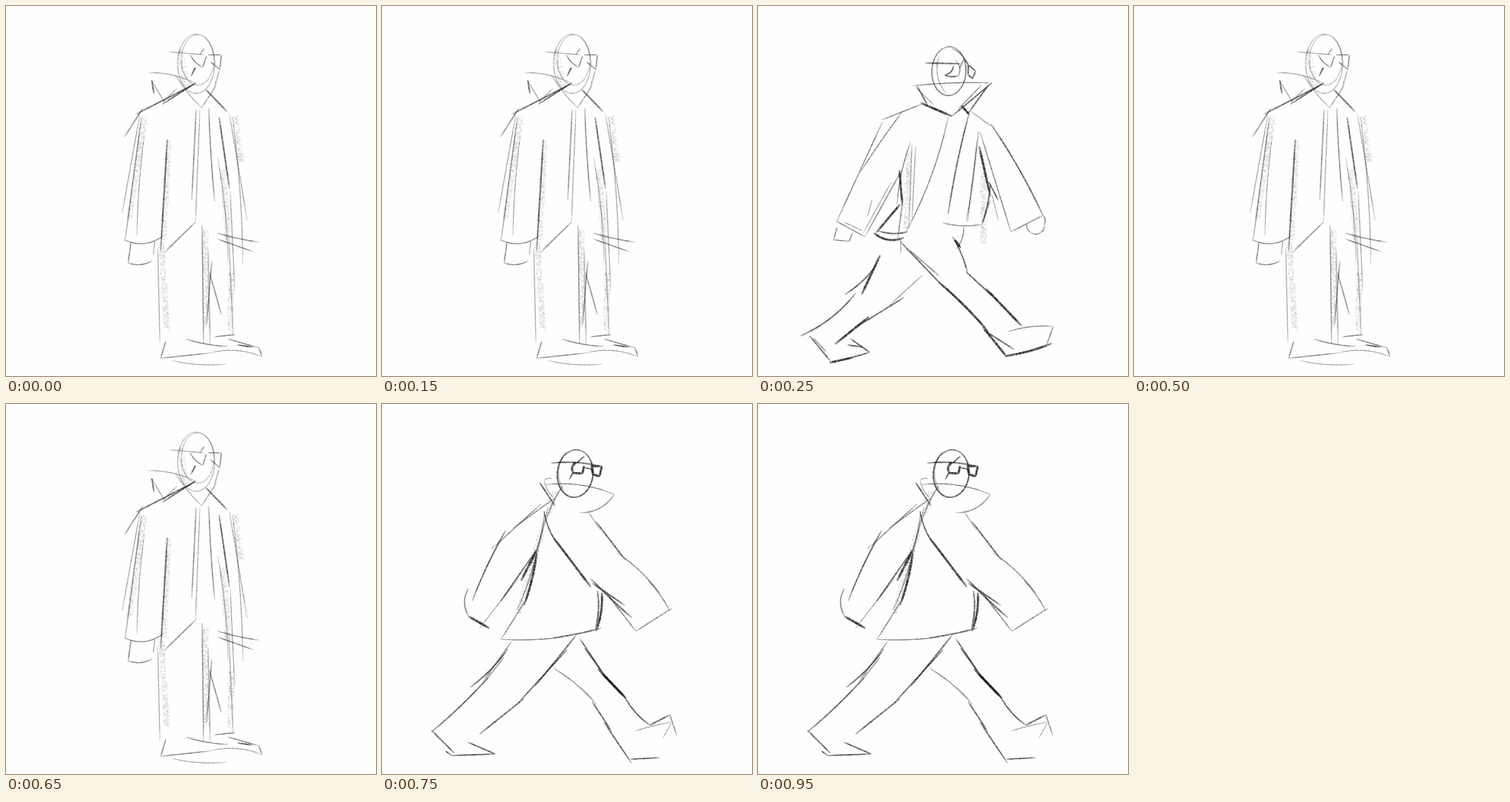
Animation of 500 by 500 pixels, one loop 1080 ms. Source, as an HTML page with a canvas:

```html
<!DOCTYPE html>
<html lang="en">
<head>
<meta charset="utf-8">
<title>Pencil walk</title>
<style>
  html, body { margin: 0; width: 100%; height: 100%; overflow: hidden; background: #fefefe; }
  canvas { display: block; width: 500px; height: 500px; }
</style>
</head>
<body>
<canvas width="500" height="500"></canvas>
<script>
const ctx = document.querySelector('canvas').getContext('2d');

let seed;
function rand() {
  seed = (seed * 16807) % 2147483647;
  return seed / 2147483647;
}

// Grainy line along at(t), tapered at both ends.
function trace(width, tone, length, at) {
  const n = Math.ceil(length / 1.5);
  let [px, py] = at(0);
  for (let i = 1; i <= n; i++) {
    const [x, y] = at(i / n);
    const press = Math.min(1, 0.5 + 3 * Math.min(i, n - i) / n);
    ctx.strokeStyle = `rgba(25,25,25,${tone * press * (0.75 + 0.4 * rand())})`;
    ctx.lineWidth = width * (0.6 + 0.4 * press) * (0.85 + 0.3 * rand());
    ctx.beginPath();
    ctx.moveTo(px, py);
    ctx.lineTo(x, y);
    ctx.stroke();
    [px, py] = [x, y];
  }
}

// Joins the points; an odd last number bows every piece sideways by that much.
function pencil(width, tone) {
  return (...p) => {
    const bend = p.length % 2 ? p.pop() : 0;
    for (let i = 0; i + 3 < p.length; i += 2) {
      const [x, y, x2, y2] = p.slice(i, i + 4);
      const dx = x2 - x, dy = y2 - y, len = Math.hypot(dx, dy);
      trace(width, tone, len, t => {
        const bow = 4 * t * (1 - t) * bend / len;
        return [x + dx * t - dy * bow, y + dy * t + dx * bow];
      });
    }
  };
}

const hair = pencil(1.3, 0.4), soft = pencil(1.5, 0.53);
const firm = pencil(1.9, 0.7), dark = pencil(2.9, 0.9);

function oval(width, tone, cx, cy, rx, ry, tilt = 0) {
  trace(width, tone, 6 * ry, t => {
    const a = t * 6.6 - 1.8, u = rx * Math.cos(a), v = ry * Math.sin(a);
    return [cx + u - v * tilt, cy + v + u * tilt];
  });
}

function smudge(x, y, x2, y2) {
  ctx.fillStyle = 'rgba(40,40,40,.08)';
  for (let i = 0; i < 3 * (y2 - y); i++) {
    const t = rand();
    ctx.fillRect(x + (x2 - x) * t + (rand() - 0.5) * 8, y + (y2 - y) * t, 1.6, 1.6);
  }
}

function standing() {
  // head
  oval(1.3, 0.33, 257, 78, 25, 40);
  oval(1.3, 0.27, 259, 73, 22, 34);
  smudge(234, 58, 243, 108);
  hair(221, 62, 268, 66);
  soft(249, 66, 266, 83, 2);
  soft(266, 83, 271, 67);
  soft(262, 66, 268, 57);
  soft(273, 66, 291, 66, 289, 86, 276, 75);
  firm(256, 83, 250, 95);
  // collar
  hair(193, 90, 257, 105, -4);
  firm(197, 100, 200, 119);
  hair(197, 101, 214, 130);
  firm(256, 104, 211, 133);
  hair(212, 130, 231, 111);
  firm(256, 105, 176, 146);
  soft(185, 138, 160, 177);
  hair(229, 93, 264, 137, 2);
  hair(264, 138, 285, 106);
  hair(288, 88, 281, 112);
  firm(270, 113, 299, 143);
  // sleeves
  hair(181, 146, 157, 280);
  soft(183, 150, 161, 317);
  hair(187, 175, 177, 310, 2);
  smudge(186, 150, 166, 285);
  soft(160, 316, 213, 310, 8);
  soft(169, 319, 165, 347);
  soft(165, 347, 198, 344, 4);
  hair(201, 318, 199, 337);
  hair(302, 146, 326, 290);
  hair(306, 150, 320, 348, -3);
  smudge(308, 148, 317, 210);
  soft(286, 307, 341, 319, 1);
  soft(286, 315, 334, 332);
  // coat
  firm(218, 180, 209, 331);
  smudge(219, 180, 212, 315);
  soft(257, 140, 251, 262);
  hair(262, 140, 256, 293);
  soft(256, 292, 214, 333);
  soft(274, 138, 282, 264, 1);
  firm(288, 150, 302, 247);
  hair(286, 205, 300, 346, -3);
  smudge(292, 220, 300, 320);
  // legs
  hair(205, 328, 208, 454);
  smudge(209, 320, 217, 438);
  soft(265, 296, 267, 456);
  hair(273, 330, 276, 458);
  soft(278, 345, 271, 430);
  soft(275, 360, 291, 417);
  smudge(269, 300, 271, 435);
  hair(303, 250, 309, 382);
  hair(301, 310, 307, 447);
  smudge(304, 360, 302, 438);
  // feet
  soft(282, 447, 310, 444);
  soft(216, 453, 209, 476);
  soft(209, 476, 275, 469);
  hair(275, 469, 346, 474, -6);
  soft(243, 450, 300, 460, 2);
  soft(300, 450, 342, 462, 346, 474);
  firm(313, 458, 333, 461);
  hair(224, 479, 298, 484, 3);
}

function stepOne() {
  // head
  oval(1.6, 0.6, 258, 88, 23, 33, 0.05);
  hair(245, 67, 254, 118, 7);
  soft(262, 57, 286, 88, -5);
  firm(226, 77, 274, 78);
  firm(264, 81, 253, 93, -3);
  firm(252, 93, 271, 94, 2);
  soft(271, 94, 266, 73, 4);
  soft(272, 85, 278, 72, 285, 79);
  firm(285, 80, 294, 88, 290, 98, 284, 93, 284, 80);
  // collar
  soft(209, 108, 316, 104, -2);
  firm(316, 104, 262, 149);
  firm(215, 108, 229, 134);
  dark(220, 131, 262, 149);
  soft(302, 107, 270, 140);
  firm(312, 106, 284, 145);
  hair(213, 110, 238, 134);
  dark(275, 135, 286, 147);
  // left sleeve and hand
  soft(220, 133, 167, 154);
  soft(195, 143, 138, 225, 1);
  soft(168, 157, 106, 292);
  soft(106, 291, 145, 312);
  hair(116, 292, 142, 304);
  soft(194, 222, 145, 311);
  hair(180, 238, 142, 307);
  hair(154, 262, 148, 285);
  soft(107, 299, 102, 316, 123, 318, 128, 306);
  // coat
  soft(206, 184, 188, 268, 3);
  hair(208, 186, 204, 300);
  hair(213, 190, 208, 290);
  smudge(204, 195, 199, 300);
  dark(191, 222, 195, 268);
  dark(192, 268, 160, 306);
  dark(157, 307, 197, 313, 6);
  firm(163, 304, 202, 305, 3);
  soft(196, 260, 189, 314);
  soft(257, 150, 200, 305, -6);
  firm(285, 146, 257, 281, 2);
  soft(250, 293, 303, 295, 3);
  soft(303, 295, 314, 262);
  // right sleeve and hand
  hair(287, 142, 316, 163);
  firm(315, 160, 385, 283, -3);
  soft(385, 283, 342, 305);
  soft(300, 170, 342, 306);
  soft(298, 170, 283, 292);
  hair(295, 190, 281, 290, -2);
  dark(299, 190, 314, 257);
  firm(314, 240, 303, 293, -2);
  firm(312, 238, 325, 263);
  smudge(304, 205, 304, 320);
  hair(316, 255, 325, 290);
  soft(363, 295, 370, 307, 382, 306, 387, 295, 385, 283, 2);
  // back leg
  dark(165, 337, 140, 390);
  firm(160, 350, 117, 390, -3);
  firm(132, 388, 57, 446, -6);
  hair(222, 364, 178, 404);
  firm(197, 394, 134, 433);
  dark(150, 420, 104, 457);
  firm(70, 446, 98, 480);
  soft(75, 449, 92, 467);
  dark(97, 482, 128, 475);
  firm(120, 477, 151, 468, 124, 449);
  firm(121, 458, 142, 461);
  // front leg
  hair(193, 315, 193, 335);
  firm(192, 318, 250, 379);
  soft(205, 330, 245, 365);
  dark(244, 373, 311, 440, -2);
  dark(304, 434, 336, 474);
  firm(305, 438, 346, 464);
  firm(263, 312, 283, 360, -2);
  dark(266, 316, 274, 327);
  soft(278, 298, 268, 328, -3);
  firm(281, 359, 320, 395);
  dark(308, 382, 356, 432);
  soft(338, 440, 399, 433, -3);
  soft(399, 433, 390, 458);
  dark(334, 473, 397, 456, 2);
}

function stepTwo() {
  // head
  oval(1.9, 0.75, 261, 94, 24, 32, 0.1);
  hair(249, 64, 246, 119, 9);
  firm(229, 80, 294, 84, -3);
  dark(262, 79, 258, 93, 3);
  dark(257, 93, 271, 94, 273, 83);
  firm(258, 93, 253, 102);
  firm(263, 80, 274, 70);
  dark(282, 84, 297, 84, 294, 98, 285, 95, 283, 85);
  firm(273, 86, 284, 88);
  // collar
  firm(213, 106, 234, 138);
  soft(221, 109, 314, 122, -6);
  soft(314, 122, 268, 147, -7);
  hair(229, 101, 219, 104, 233, 128, 2);
  soft(244, 111, 222, 157, 2);
  smudge(234, 118, 224, 148);
  // left sleeve
  soft(232, 128, 177, 168);
  soft(215, 135, 148, 196);
  firm(167, 171, 122, 266, 2);
  soft(117, 249, 118, 288, 6);
  dark(117, 287, 145, 303);
  hair(131, 304, 184, 236);
  firm(160, 267, 209, 197);
  dark(208, 199, 188, 239);
  // coat
  soft(224, 140, 202, 215, -2);
  soft(220, 145, 183, 278, -5);
  dark(209, 202, 192, 272, -2);
  soft(196, 262, 161, 318);
  smudge(216, 170, 183, 282);
  firm(219, 145, 238, 190, 3);
  dark(232, 181, 282, 247);
  soft(161, 318, 244, 315, 2);
  firm(232, 316, 296, 303, 1);
  dark(297, 255, 289, 307, -3);
  firm(291, 252, 288, 304, -3);
  // right sleeve
  hair(279, 146, 295, 170);
  firm(289, 159, 329, 211);
  soft(318, 201, 375, 255, -3);
  soft(359, 238, 389, 280, -2);
  soft(392, 276, 343, 307, 300, 251);
  firm(282, 236, 338, 289, 1);
  firm(284, 242, 328, 272);
  smudge(289, 242, 322, 277);
  // back leg
  soft(175, 321, 136, 376);
  firm(170, 331, 119, 383, -3);
  soft(165, 342, 136, 379);
  firm(143, 370, 67, 443, -2);
  firm(262, 313, 207, 381);
  firm(250, 332, 184, 404);
  firm(192, 398, 132, 446);
  firm(67, 441, 98, 472);
  firm(86, 469, 94, 475, 153, 473, 116, 457);
  // front leg
  soft(232, 357, 290, 406, -3);
  firm(284, 402, 310, 442);
  firm(300, 430, 337, 485);
  firm(268, 318, 298, 363);
  firm(274, 330, 298, 363);
  dark(292, 358, 330, 398);
  dark(298, 365, 329, 397);
  firm(328, 396, 362, 434, 3);
  firm(362, 434, 389, 420);
  soft(389, 420, 398, 447);
  hair(342, 442, 391, 430, -1);
  hair(391, 431, 380, 451);
  firm(336, 480, 375, 478);
}

const poses = [standing, stepOne, standing, stepTwo];
const loop = 1080, hold = 250;

let shown;
const start = performance.now();
function tick() {
  const time = (performance.now() - start) % loop;
  const pose = poses[Math.min(3, Math.floor(time / hold))];
  if (pose !== shown) {
    shown = pose;
    seed = 77;
    ctx.clearRect(0, 0, 500, 500);
    pose();
  }
  requestAnimationFrame(tick);
}
tick();
</script>
</body>
</html>
```
